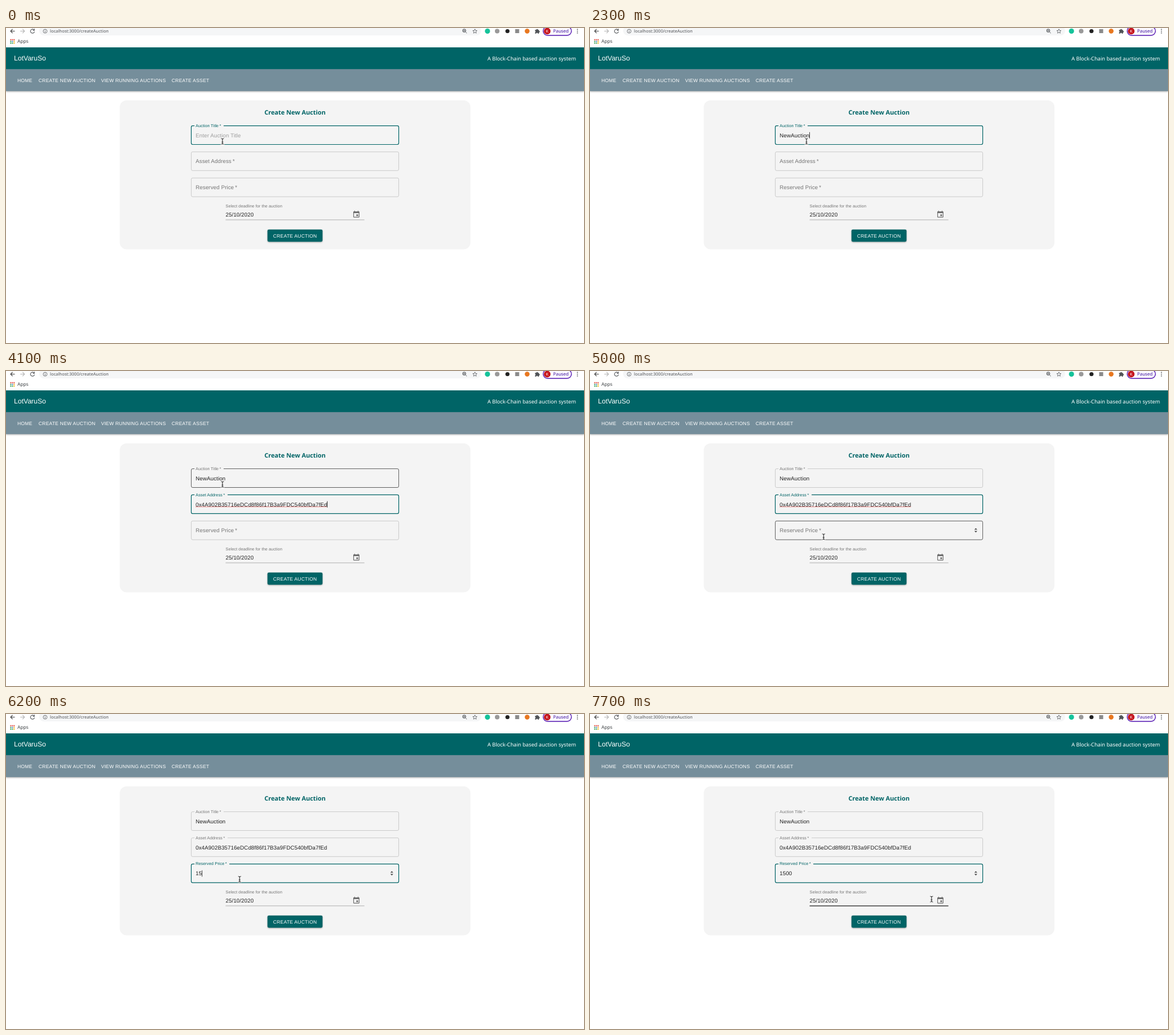
An HTML page for the animation above (8 s loop, 1012 px wide and 553 px high).

```html
<!DOCTYPE html>
<html lang="en">
<head>
<meta charset="utf-8">
<title>Create New Auction</title>
<style>
  html, body { margin: 0; width: 100%; height: 100%; overflow: hidden; background: #fff; }
  svg { display: block; width: 100%; height: 100%; --teal: #006466; }
  text { font-family: "Liberation Sans", Arial, sans-serif; text-rendering: geometricPrecision; white-space: pre; }
  .ui { font-family: "Noto Sans", "Open Sans", sans-serif; }
  .body { font-size: 9.64px; letter-spacing: .00938em; fill: #212121; }
  .small { font-size: 7.23px; letter-spacing: .00938em; }
  .muted { fill: #757575; }
  .hint { fill: #9f9f9f; }
  .button { font-size: 8.43px; letter-spacing: .02857em; fill: #fff; }
  .line { fill: none; stroke: #55585c; stroke-width: 1.1; }
  .frame { fill: none; stroke: #bdbdbd; stroke-width: .75; }
  .hover .frame { stroke: #2b2b2b; }
  .focus .frame { stroke: var(--teal); stroke-width: 1.2; }
  .focus .label { fill: var(--teal); }
  .deadline { stroke: #929292; stroke-width: .7; }
  .deadline.hover { stroke: #1c1c1c; stroke-width: 1.2; }
  .nav { filter: drop-shadow(0 1.5px 1.6px rgba(0,0,0,.32)); }
  .raised { filter: drop-shadow(0 1px 1px rgba(0,0,0,.32)); }
</style>
</head>
<body>
<svg viewBox="0 0 1012 553" xmlns="http://www.w3.org/2000/svg">
  <!-- browser toolbar -->
  <rect x="58" y="-3" width="774" height="16" rx="8" fill="#f5f6f7"/>
  <g class="line">
    <path d="M15.5 5.5H8M11.5 2L8 5.5L11.5 9" stroke="#444"/>
    <path d="M25 5.5H32.5M29 2L32.5 5.5L29 9" stroke="#b5b5b5"/>
    <path d="M49 3.3A3.5 3.5 0 1 0 49.8 6.3M49.7 1.3V4.2H46.8"/>
    <circle cx="68.5" cy="5.6" r="3.4" stroke-width=".8"/>
    <path d="M68.5 5.2V7.6M68.5 3.4V4.3" stroke-width=".9"/>
    <circle cx="802.3" cy="4.6" r="2.6"/>
    <path d="M804.2 6.5L807 9.3M801 4.6H803.6M802.3 3.3V5.9" stroke-width=".9"/>
    <path d="M821 1.8L822.1 4.4L824.8 4.6L822.7 6.4L823.4 9.1L821 7.6L818.6 9.1L819.3 6.4L817.2 4.6L819.9 4.4Z" stroke-width=".8"/>
  </g>
  <circle cx="843" cy="5.5" r="4.5" fill="#15c39a"/>
  <circle cx="860" cy="5.5" r="4" fill="#999"/>
  <circle cx="878" cy="5.5" r="3.6" fill="#222"/>
  <rect x="891.5" y="2" width="7" height="7" fill="#8b8b8b"/>
  <circle cx="912.5" cy="5.5" r="4.2" fill="#e8771f"/>
  <path d="M926.3 3.2H928.5A1.4 1.4 0 0 1 931.3 3.2H933.2V5A1.4 1.4 0 0 1 933.2 7.8V9.8H931.2A1.4 1.4 0 0 0 928.4 9.8H926.3V7.7A1.3 1.3 0 0 0 926.3 5.2Z" fill="#505357"/>
  <rect x="940.5" y="-2.5" width="49.5" height="15.5" rx="7.75" fill="#fbf9ff" stroke="#5214b0" stroke-width="1.4"/>
  <circle cx="947.6" cy="5.5" r="5.8" fill="#c5141c"/>
  <text x="947.6" y="8" font-size="7" fill="#fff" text-anchor="middle">K</text>
  <text class="ui" x="958" y="8.3" font-size="7.85" fill="#3d0f9c">Paused</text>
  <g fill="#505357"><circle cx="1000.5" cy="2.5" r=".9"/><circle cx="1000.5" cy="5.6" r=".9"/><circle cx="1000.5" cy="8.7" r=".9"/></g>
  <text class="ui" x="77" y="8.3" font-size="7.53" fill="#505357">localhost:3000/createAuction</text>
  <g id="apps"></g>
  <text class="ui" x="20" y="26.3" font-size="8.2" fill="#3c4043">Apps</text>

  <!-- page header -->
  <rect class="nav" y="72" width="1012" height="38.8" fill="#758e9b"/>
  <rect y="34" width="1012" height="38.2" fill="var(--teal)"/>
  <text x="14" y="57.4" font-size="12.05" fill="#fff">LotVaruSo</text>
  <text class="ui" x="998" y="56.8" font-size="9.2" fill="#fff" text-anchor="end">A Block-Chain based auction system</text>
  <g class="button">
    <text x="20" y="94.6">HOME</text>
    <text x="57" y="94.6">CREATE NEW AUCTION</text>
    <text x="166.4" y="94.6">VIEW RUNNING AUCTIONS</text>
    <text x="290" y="94.6">CREATE ASSET</text>
  </g>

  <!-- form -->
  <rect x="199.2" y="127" width="614" height="261.5" rx="12" fill="#f4f4f4"/>
  <text class="ui" x="506" y="151.7" font-size="10.8" font-weight="700" fill="var(--teal)" text-anchor="middle">Create New Auction</text>
  <g id="fields"></g>
  <path id="spinner" d="M672.9 278.4L675.5 275.7L678.1 278.4ZM672.9 280.8L675.5 283.5L678.1 280.8Z" fill="#4a4a4a"/>
  <path id="spelling" fill="none" stroke="#e5413d" stroke-width=".9" stroke-dasharray="1.3 .7"/>
  <text class="small muted" x="384.5" y="315.2">Select deadline for the auction</text>
  <text class="body" x="384.5" y="330.6">25/10/2020</text>
  <path id="deadline" d="M384.5 336.8H627.5"/>
  <path transform="translate(606.2 320.1) scale(.602)" fill="#6f6f6f" d="M17 12h-5v5h5v-5zM16 1v2H8V1H6v2H5c-1.11 0-2 .9-2 2v14c0 1.1.89 2 2 2h14c1.1 0 2-.9 2-2V5c0-1.1-.9-2-2-2h-1V1h-2zm3 18H5V8h14v11z"/>
  <rect class="raised" x="457.8" y="353.8" width="96.4" height="21.4" rx="2.4" fill="var(--teal)"/>
  <text class="button" x="506" y="367.6" text-anchor="middle">CREATE AUCTION</text>

  <rect id="caret" width=".8" height="11" fill="#111"/>
  <g id="mouse" fill="none" stroke-linecap="round">
    <path id="beam" d="M-2.2 -5Q0 -5 0 -3.6Q0 -5 2.2 -5M0 -3.6V3.6M-2.2 5Q0 5 0 3.6Q0 5 2.2 5" stroke="#fff" stroke-width="2.4"/>
    <use href="#beam" style="display:none"/>
    <path d="M-2.2 -5Q0 -5 0 -3.6Q0 -5 2.2 -5M0 -3.6V3.6M-2.2 5Q0 5 0 3.6Q0 5 2.2 5M-1 1.2H1" stroke="#222" stroke-width="1.1"/>
  </g>
</svg>
<script>
const LOOP = 8000, LEFT = 324, RIGHT = 688, TEXT_X = 332;
const byId = id => document.getElementById(id);

function add(parent, tag, attrs = {}, text = '') {
  const node = document.createElementNS('http://www.w3.org/2000/svg', tag);
  for (const key in attrs) node.setAttribute(key, attrs[key]);
  node.textContent = text;
  return parent.appendChild(node);
}

const appColors = ['#e04a3f', '#e04a3f', '#e04a3f', '#34a058', '#4285f4', '#f2b51d', '#34a058', '#34a058', '#f2b51d'];
appColors.forEach((fill, i) =>
  add(byId('apps'), 'rect', { x: 7.3 + i % 3 * 3, y: 19.6 + Math.floor(i / 3) * 3, width: 2, height: 2, fill }));

// Rounded outline, left open between 330 and gapEnd when the label floats.
function outline(top, gapEnd) {
  const r = 2.4, l = LEFT + .4, e = RIGHT - .4, t = top + .4, b = top + 33.3;
  const sides = `H${e - r}Q${e} ${t} ${e} ${t + r}V${b - r}Q${e} ${b} ${e - r} ${b}` +
    `H${l + r}Q${l} ${b} ${l} ${b - r}V${t + r}Q${l} ${t} ${l + r} ${t}`;
  return gapEnd ? `M${gapEnd} ${t}${sides}H330` : `M${l + r} ${t}${sides}Z`;
}

function makeField(name, top, gapEnd, label, hint) {
  const group = add(byId('fields'), 'g');
  const frame = add(group, 'path');
  frame.setAttribute('class', 'frame');
  const labelNode = add(group, 'text', { x: TEXT_X }, label + '\u2009*');
  const value = add(group, 'text', { x: TEXT_X, y: top + 20.5 });
  return {
    top, value,
    draw(state) {
      const focused = state.focus === name, text = state[name];
      const floating = focused || text !== '';
      group.setAttribute('class', focused ? 'focus' : state.hover === name ? 'hover' : '');
      frame.setAttribute('d', outline(top, floating && gapEnd));
      labelNode.setAttribute('class', `label muted ${floating ? 'small' : 'body'}`);
      labelNode.setAttribute('y', top + (floating ? 2.5 : 20));
      if (!floating) labelNode.style.fill = '#757575';
      else labelNode.style.fill = '';
      value.textContent = text || (focused ? hint : '');
      value.setAttribute('class', 'body');
      value.style.fill = text ? '' : '#9f9f9f';
    }
  };
}

const fields = {
  title: makeField('title', 171.2, 381, 'Auction Title', 'Enter Auction Title'),
  asset: makeField('asset', 217, 388, 'Asset Address', 'Enter Address of the asset you wish to sell'),
  price: makeField('price', 262.9, 391, 'Reserved Price', 'Enter Reserved Price for asset')
};

// Each step lists only what changes.
const steps = [
  [0, { title: '', asset: '', price: '', focus: 'title', hover: 'title', caret: false, mouse: [379, 199] }],
  [200, { caret: true }],
  [300, { title: 'N' }],
  [700, { title: 'Ne' }],
  [800, { title: 'New' }],
  [1400, { title: 'NewA' }],
  [1700, { title: 'NewAu' }],
  [1800, { title: 'NewAuc' }],
  [2000, { title: 'NewAuct' }],
  [2200, { title: 'NewAuctio' }],
  [2300, { title: 'NewAuction' }],
  [3500, { focus: 'asset', caret: false }],
  [4100, { asset: '0x4A902B35716eDCd8f86f17B3a9FDC540bfDa7fEd', caret: true }],
  [4700, { hover: '', caret: false, mouse: [410, 318] }],
  [5000, { hover: 'price', mouse: [409, 291] }],
  [5600, { focus: 'price', caret: true, mouse: [409, 290] }],
  [5900, { caret: false }],
  [6200, { price: '15', caret: true }],
  [6500, { price: '150' }],
  [6800, { price: '1500' }],
  [7300, { hover: '', caret: false, mouse: [490, 317] }],
  [7700, { hover: 'deadline', mouse: [598, 325] }]
];

const show = (id, visible) => byId(id).setAttribute('visibility', visible ? 'visible' : 'hidden');

function draw(state) {
  Object.values(fields).forEach(field => field.draw(state));
  const { top, value } = fields[state.focus];
  const width = state[state.focus] ? value.getComputedTextLength() : 0;

  byId('caret').setAttribute('x', TEXT_X + width - .1);
  byId('caret').setAttribute('y', top + 11.6);
  show('caret', state.caret);

  byId('spelling').setAttribute('d', `M${TEXT_X} ${top + 21.5}h${width}`);
  show('spelling', state.focus === 'asset' && state.asset);
  show('spinner', state.focus === 'price' || state.hover === 'price');
  byId('deadline').setAttribute('class', state.hover === 'deadline' ? 'deadline hover' : 'deadline');
  byId('mouse').setAttribute('transform', `translate(${state.mouse})`);
}

const start = performance.now();
let current = -1;
function tick() {
  const time = Math.max(0, performance.now() - start) % LOOP;
  const index = steps.filter(([at]) => at <= time).length - 1;
  if (index !== current) {
    current = index;
    draw(Object.assign({}, ...steps.slice(0, index + 1).map(([, change]) => change)));
  }
  requestAnimationFrame(tick);
}
tick();
</script>
</body>
</html>
```
